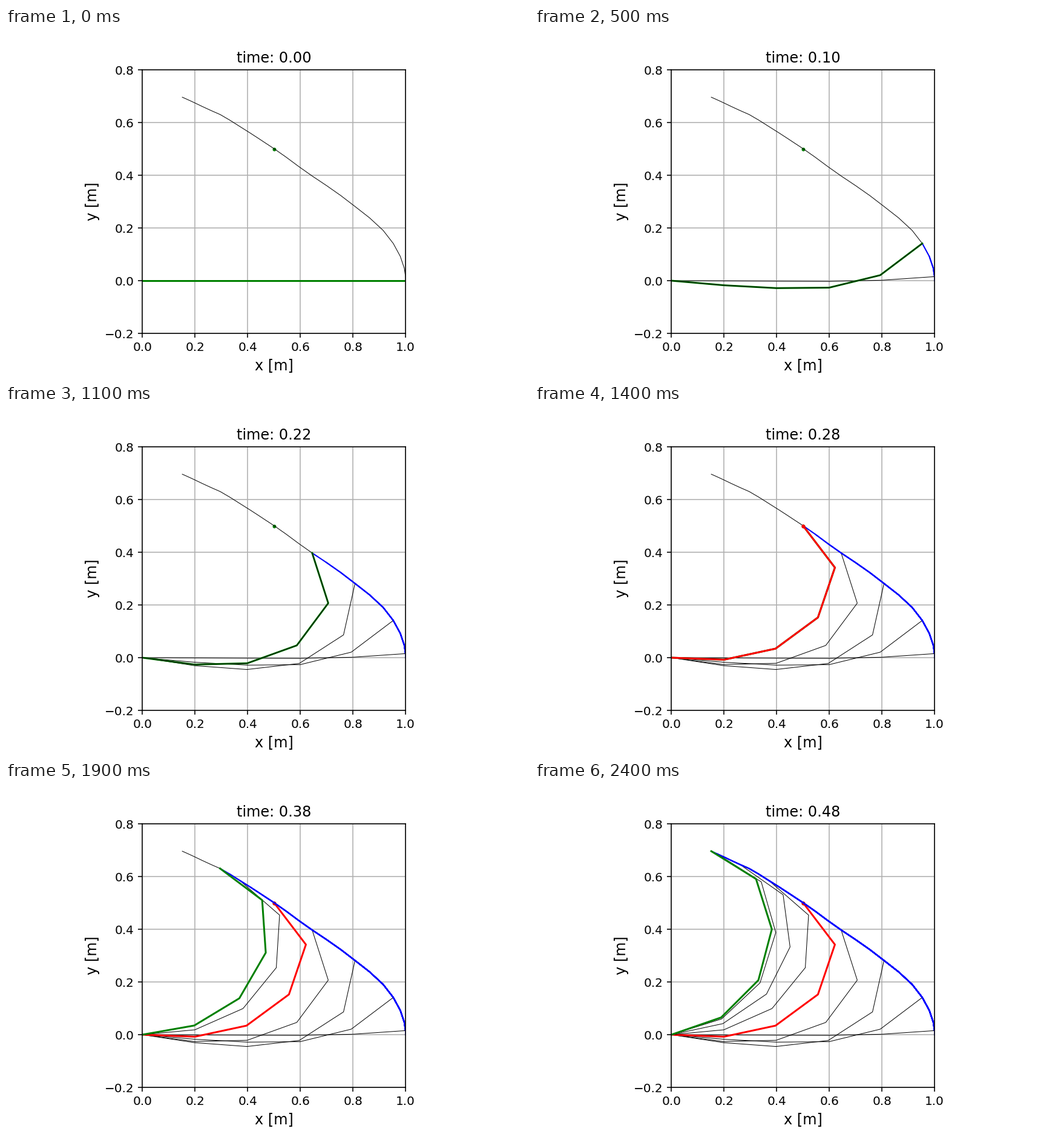
A matplotlib script that plays this animation: 864x576 px, repeating every 2500 ms.

```python
import numpy as np
import matplotlib.pyplot as plt
from matplotlib.animation import FuncAnimation

FRAMES, INTERVAL, DT = 25, 100, 0.02
LINK = 0.2          # link length in metres
HIT = 14            # step at which the tip passes the dot

# Absolute angles of the five links in degrees, at a few key steps
KEY_POSES = {
    0: (0, 0, 0, 0, 0),
    2: (-0.3, -0.3, -0.2, 1.3, 3.9),
    5: (-5.0, -3.1, 0.5, 13.7, 37.0),
    8: (-8.7, -4.2, 6.6, 32.8, 77.4),
    9: (-8.9, -3.0, 11.1, 39.1, 88.7),
    11: (-7.5, 1.4, 19.8, 53.3, 107.8),
    14: (-2.2, 12.1, 36.3, 71.2, 127.3),
    17: (5.3, 23.8, 50.8, 86.4, 139.0),
    19: (10.0, 31.1, 59.9, 93.9, 143.1),
    20: (12.1, 34.1, 63.4, 97.6, 145.0),
    23: (17.4, 43.2, 72.6, 106.0, 147.6),
    24: (19.1, 45.0, 75.2, 107.5, 148.2),
}


def hermite(t, y, x):
    """Smooth interpolation of the rows of y at times t."""
    m = np.gradient(y, t, axis=0)
    m[0] = 0
    i = np.clip(np.searchsorted(t, x, side="right") - 1, 0, len(t) - 2)
    h = (t[i + 1] - t[i])[:, None]
    s = (x - t[i])[:, None] / h
    return ((1 + 2 * s) * (1 - s) ** 2 * y[i] + s * (1 - s) ** 2 * h * m[i]
            + s ** 2 * (3 - 2 * s) * y[i + 1] + s ** 2 * (s - 1) * h * m[i + 1])


times = np.array(list(KEY_POSES), float)
keys = np.array(list(KEY_POSES.values()), float)
angles = np.radians(hermite(times, keys, np.arange(FRAMES, dtype=float)))

joints = np.zeros((FRAMES, 6, 2))
joints[:, 1:, 0] = LINK * np.cumsum(np.cos(angles), axis=1)
joints[:, 1:, 1] = LINK * np.cumsum(np.sin(angles), axis=1)
tips = joints[:, -1]

fig, ax = plt.subplots(figsize=(6, 4), dpi=144)
fig.subplots_adjust(left=0.125, right=0.9, bottom=0.125, top=0.88)
ax.set_aspect("equal")
ax.set(xlim=(0, 1), ylim=(-0.2, 0.8))
ax.set_xticks(np.linspace(0, 1, 6))
ax.set_yticks(np.linspace(-0.2, 0.8, 6))
ax.set_xlabel("x [m]", fontsize=12)
ax.set_ylabel("y [m]", fontsize=12)
title = ax.set_title("time: 0.00", fontsize=12)
ax.grid(True)


def line(points, color, width, z):
    return ax.plot(*points.T, color=color, lw=width, zorder=z)[0]


def dot(color, z):
    return ax.plot(0.5, 0.5, "o", color=color, ms=2, zorder=z)[0]


def layer(step, sub=0):
    return 2 + 0.01 * step + 0.001 * sub


dot("green", 1.98)
line(tips, "black", 0.5, 1.99)
arm = line(joints[0], "green", 1.5, 2)

# Marks that stay on the plot, with the step at which each appears
marks = [(k, line(tips[:k + 1], "blue", 1, layer(k))) for k in range(1, FRAMES)]
marks += [(k, line(joints[k], "black", 0.5, layer(k, 3)))
          for k in range(2, FRAMES, 3)]
marks += [(HIT, line(joints[HIT], "red", 1.5, layer(HIT, 4))),
          (HIT, dot("red", layer(HIT, 5)))]


def update(i):
    title.set_text(f"time: {i * DT:.2f}")
    arm.set_data(*joints[i].T)
    arm.set_zorder(layer(i, 2))
    for step, mark in marks:
        mark.set_visible(step <= i)


anim = FuncAnimation(fig, update, frames=FRAMES, init_func=lambda: update(0),
                     interval=INTERVAL, repeat=True, repeat_delay=0)
plt.show()
```
